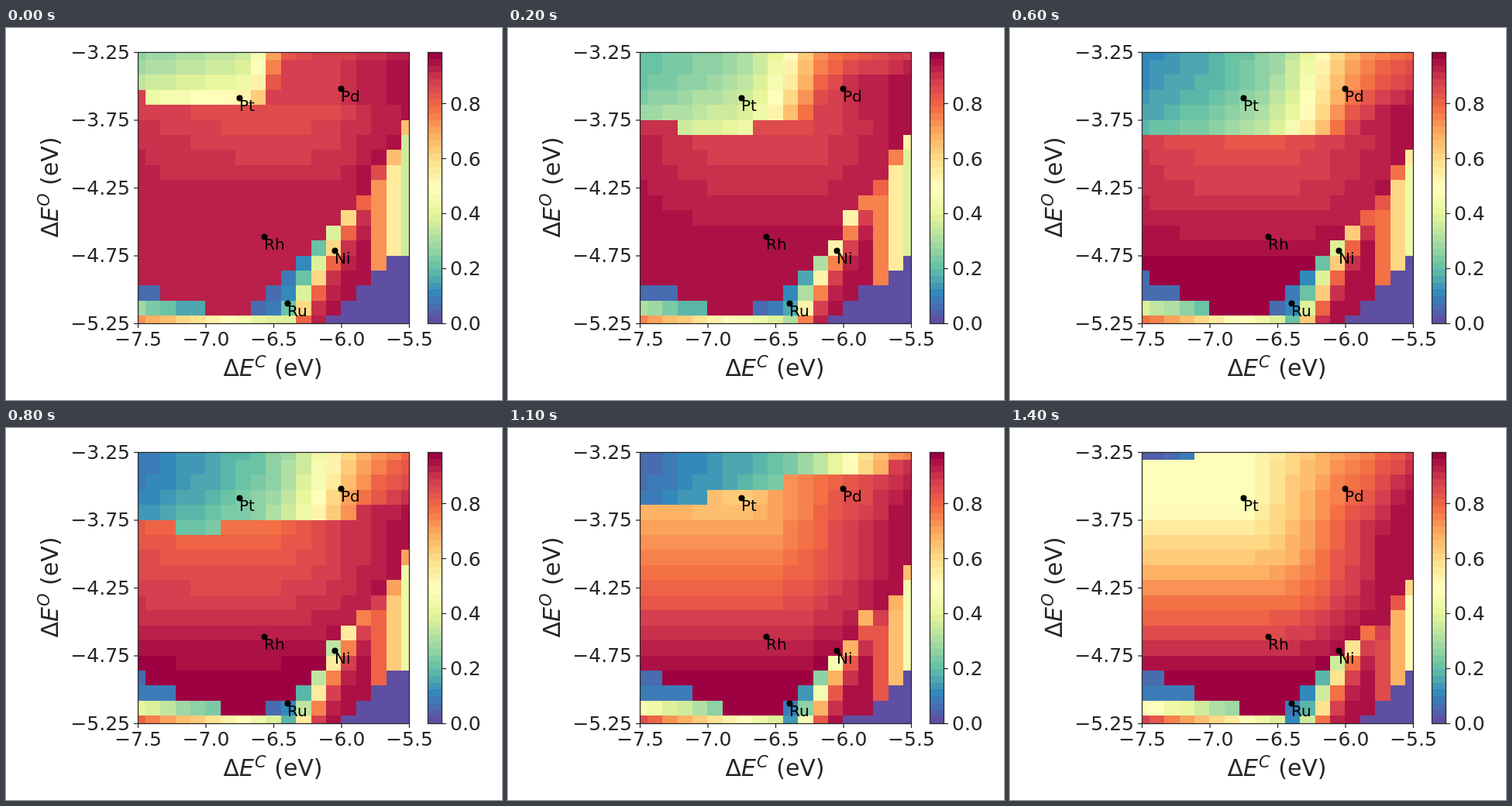
An HTML page with a canvas that plays this animation: 640 px wide and 480 px high, repeating every 1.5 s.

```html
<!DOCTYPE html>
<html>
<head>
<meta charset="utf-8">
<style>
  html, body { margin: 0; width: 100%; height: 100%; overflow: hidden; background: #fff; }
  canvas { display: block; }
</style>
</head>
<body>
<canvas id="plot" width="640" height="480"></canvas>
<script>
const ctx = document.getElementById('plot').getContext('2d');
const LEFT = 170.5, TOP = 31.5, SIZE = 350, CELLS = 18, STEP = SIZE / CELLS;
const LEVELS = 40, VMAX = 0.987, INK = '#262626', FONT = '"DejaVu Sans", sans-serif';

const clamp = (v, lo = 0, hi = 1) => Math.min(hi, Math.max(lo, v));
const mix = (a, b, k) => a + (b - a) * k;
const sigmoid = v => 1 / (1 + Math.exp(-v));
const bell = v => Math.exp(-v * v);

// Spectral colour ramp, violet to dark red, cut into flat bands
const ramp = ['5e4fa2', '3288bd', '66c2a5', 'abdda4', 'e6f598', 'ffffbf',
              'fee08b', 'fdae61', 'f46d43', 'd53e4f', '9e0142']
  .map(hex => [0, 2, 4].map(i => parseInt(hex.slice(i, i + 2), 16)));
const palette = Array.from({ length: LEVELS }, (_, i) => {
  const p = i / (LEVELS - 1) * 10, k = Math.min(9, Math.floor(p));
  return `rgb(${ramp[k].map((c, j) => Math.round(mix(c, ramp[k + 1][j], p - k)))})`;
});

// Upper left: low plateau climbing to the right
function plateau(x, y, t) {
  const settle = Math.exp(-t / 2);
  const edge = 11.2 - 2.6 * settle + 0.025 * t * t;
  const climb = (0.45 + 0.03 * y) * sigmoid((x - edge) / (1.5 - 1.1 * settle));
  const base = 0.27 * Math.exp(-t / 6.5) + (0.012 + 0.0004 * t) * x;
  const v = base + (0.003 + 0.015 * settle ** 2) * y * y + climb;
  return Math.min(v, 0.87 + 0.015 * Math.max(0, x - 12));
}

// Lower border of the plateau: drops quickly, then retreats from the right
function plateauBorder(x, t) {
  const late = Math.max(0, t - 6);
  const bump = 0.69 * clamp(1 - (late / 6) ** 2) * bell((x - 4.5) / 2.5);
  return 5 - 2.05 * Math.exp(-t) - 0.065 * late ** 2 + (0.01 - 0.03 * late) * x + bump;
}

// Middle: bowl that deepens with time and rises downwards and to both sides
function bowl(x, y, t) {
  const settle = Math.exp(-t / 2), center = 9 - 0.18 * t;
  const low = 0.83 - 0.36 * (t / 14) ** 2.5;
  const high = mix(0.98 - 0.065 * settle, 0.96, clamp((x - 13) / 2));
  const down = clamp((y - 3) / (12 - 6 * settle));
  const side = x < center
    ? (center - x) * mix(0.1, 0.01, t / 14) * clamp(y / 6)
    : (x - center) / 10 * Math.min(1, 0.7 + 0.06 * y);
  return mix(low, high, clamp(Math.cbrt(down ** 3 + side ** 3)));
}

// Value of one grid point; t counts steps of 100 ms
function field(x, y, t) {
  if (y >= 13.1 + 0.125 * t + (18 - x) * 0.85) return 0;

  // striped columns on the right
  const depth = y - 8 - 0.25 * t + 1.5 * (x - 16);
  if (x >= 16 && depth >= 0) {
    const column = 0.73 - 0.18 * (x - 16) + 0.0085 * t;
    return mix(bowl(x, y, t), column, Math.min(1, 0.5 + 0.5 * depth));
  }

  // bottom edge and lower left corner
  if (y === 18 && x < 10) return mix(0.72 + 0.011 * t, 0.38, x / 9);
  if (y >= 15 && x <= 2.3 * (y - 15) - 0.5 + 0.14 * t) {
    if (y < 17) return 0.06 + (y - 15) * 0.002 * t;
    return Math.max(0.17 + 0.008 * t, 0.28 + 0.017 * t - 0.04 * x);
  }

  // diagonal valley
  if (x > 7 && x < 16 && x + y >= 25 + 0.14 * t - 0.04 * (x - 11) ** 2)
    return 0.06 + 0.9 * sigmoid((2 * x + y - 0.15 * t - 38.6) / 0.95);

  return y <= plateauBorder(x, t) ? plateau(x, y, t) : bowl(x, y, t);
}

function drawField(t) {
  const edge = (i, start) => Math.round(start + clamp((i - 0.5) * STEP, 0, SIZE));
  for (let y = 0; y <= CELLS; y++)
    for (let x = 0; x <= CELLS; x++) {
      const band = clamp(Math.floor(field(x, y, t) / VMAX * LEVELS), 0, LEVELS - 1);
      const x0 = edge(x, 169.9), y0 = edge(y, 31);
      ctx.fillStyle = palette[band];
      ctx.fillRect(x0, y0, edge(x + 1, 169.9) - x0, edge(y + 1, 31) - y0);
    }
}

function text(str, x, y, size, align = 'left', style = '') {
  ctx.font = `${style} ${size}px ${FONT}`;
  ctx.textAlign = align;
  ctx.fillText(str, x, Math.round(y));
  return x + ctx.measureText(str).width;
}

function line(x0, y0, x1, y1) {
  ctx.beginPath();
  ctx.moveTo(x0, y0);
  ctx.lineTo(x1, y1);
  ctx.stroke();
}

function axisTitle(sup, x, y, angle) {
  ctx.save();
  ctx.translate(x, y);
  ctx.rotate(angle);
  let end = text('Δ', -64.5, 0, 30);
  end = text('E', end, 0, 30, 'left', 'italic');
  end = text(sup, end + 1, -11, 21, 'left', 'italic');
  text(' (eV)', end + 1, 0, 30);
  ctx.restore();
}

function drawAxes() {
  ctx.strokeStyle = ctx.fillStyle = INK;
  ctx.lineWidth = 1.25;
  ctx.strokeRect(LEFT, TOP, SIZE, SIZE);
  for (let i = 0; i < 5; i++) {
    const pos = i * SIZE / 4;
    line(LEFT + pos, 381.5, LEFT + pos, 387);
    line(165, TOP + pos, LEFT, TOP + pos);
    text('−' + (7.5 - i / 2).toFixed(1), LEFT + pos, 410, 25, 'center');
    text('−' + (3.25 + i / 2).toFixed(2), 160, TOP + pos + 8.3, 25, 'right');
  }
  axisTitle('C', 345, 449, 0);
  axisTitle('O', 67, 206, -Math.PI / 2);
}

function drawColorbar() {
  for (let i = 0; i < LEVELS; i++) {
    const y0 = Math.round(381 - (i + 1) * SIZE / LEVELS);
    ctx.fillStyle = palette[i];
    ctx.fillRect(545, y0, 17, Math.round(381 - i * SIZE / LEVELS) - y0);
  }
  ctx.fillStyle = INK;
  ctx.strokeRect(544.5, TOP, 18, SIZE);
  for (let i = 0; i < 5; i++) {
    const y = 381.3 - i * 0.2 / VMAX * SIZE;
    line(562.5, Math.floor(y) + 0.5, 568, Math.floor(y) + 0.5);
    text((i * 0.2).toFixed(1), 573, y + 9, 25);
  }
}

const metals = [['Pt', 301.5, 90.5], ['Pd', 432.5, 78.5], ['Rh', 333.5, 269.5],
                ['Ni', 424.5, 287.5], ['Ru', 363.5, 355.5]];

function drawMetals() {
  ctx.fillStyle = '#000';
  for (const [name, x, y] of metals) {
    ctx.beginPath();
    ctx.arc(x, y, 4, 0, 2 * Math.PI);
    ctx.fill();
    text(name, x - 0.5, y + 16.4, 20);
  }
}

function render(now) {
  ctx.fillStyle = '#fff';
  ctx.fillRect(0, 0, 640, 480);
  drawField(Math.floor(now / 100) % 15);
  drawAxes();
  drawColorbar();
  drawMetals();
  requestAnimationFrame(render);
}
render(performance.now());
</script>
</body>
</html>
```
